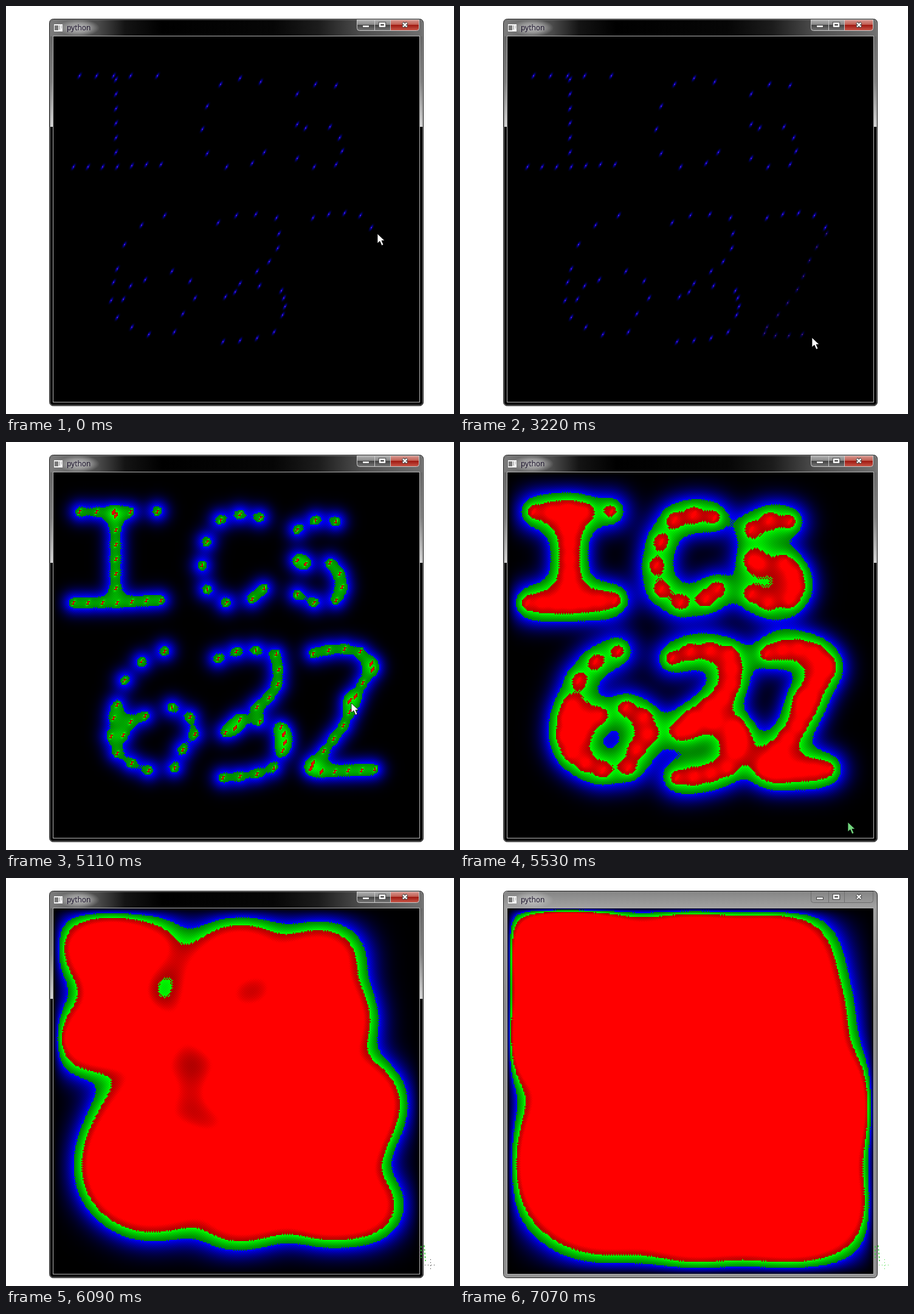
These frames come from a looping animation (737 px wide and 672 px high, 7.14 s). An HTML page with a canvas:

```html
<!DOCTYPE html>
<html lang="en">
<head>
<meta charset="utf-8">
<title>python</title>
<style>
  html, body { margin: 0; width: 100%; height: 100%; overflow: hidden; background: #fff; }
  svg, canvas { position: absolute; left: 0; top: 0; }
  canvas { left: 78px; top: 50px; width: 602px; height: 602px; image-rendering: pixelated; }
  text { font: 12px "Open Sans", "Noto Sans", sans-serif; }
  .inactive .active-only, svg:not(.inactive) .inactive-only { display: none; }
</style>
</head>
<body>
<svg id="chrome" width="737" height="672" viewBox="0 0 737 672">
  <defs>
    <linearGradient id="bar">
      <stop offset="0" stop-color="#7c7c7c"/><stop offset=".13" stop-color="#4a4a4a"/>
      <stop offset=".2" stop-color="#141414"/><stop offset=".3" stop-color="#000"/>
      <stop offset=".6" stop-color="#060606"/><stop offset=".72" stop-color="#1c1c1c"/>
      <stop offset=".83" stop-color="#4c4c4c"/><stop offset="1" stop-color="#707070"/>
    </linearGradient>
    <linearGradient id="side" x2="0" y2="1">
      <stop offset="0" stop-color="#666"/><stop offset=".5" stop-color="#808080"/><stop offset="1" stop-color="#d4d4d4"/>
    </linearGradient>
    <linearGradient id="dull" x2="0" y2="1">
      <stop offset="0" stop-color="#858585"/><stop offset=".04" stop-color="#a0a0a0"/>
      <stop offset=".3" stop-color="#8c8c8c"/><stop offset="1" stop-color="#929292"/>
    </linearGradient>
    <linearGradient id="glass" x2="0" y2="1">
      <stop offset="0" stop-color="#b4b4b4"/><stop offset=".48" stop-color="#858585"/>
      <stop offset=".5" stop-color="#444"/><stop offset="1" stop-color="#777"/>
    </linearGradient>
    <linearGradient id="close" x2="0" y2="1">
      <stop offset="0" stop-color="#d89d96"/><stop offset=".48" stop-color="#c0584c"/>
      <stop offset=".5" stop-color="#a01a12"/><stop offset="1" stop-color="#c8584a"/>
    </linearGradient>
    <radialGradient id="glow">
      <stop offset="0" stop-color="#d0d0d0" stop-opacity=".85"/><stop offset=".55" stop-color="#bbb" stop-opacity=".6"/>
      <stop offset="1" stop-color="#bbb" stop-opacity="0"/>
    </radialGradient>
  </defs>
  <g class="active-only">
    <rect x="72" y="22" width="614.5" height="636.5" rx="6" fill="#000"/>
    <path d="M73 50V28q0-5 5-5H681q5 0 5 5V50z" fill="url(#bar)"/>
    <path d="M73 50h4v149h-4zM681 50h5v149h-5z" fill="url(#side)"/>
    <rect x="72.5" y="22.5" width="613" height="635" rx="5" fill="none" stroke="#aaa" opacity=".75"/>
  </g>
  <rect class="inactive-only" x="72" y="22" width="614.5" height="636.5" rx="6" fill="url(#dull)"/>
  <rect x="71.5" y="21.5" width="615" height="637" rx="6" fill="none" stroke="#1c1c1c"/>
  <rect x="77.5" y="49.5" width="603" height="603" fill="#000" stroke="#b4b4b4"/>
  <ellipse cx="120" cy="36" rx="34" ry="14" fill="url(#glow)"/>
  <path d="M79 30h14v12H79z" fill="#f4f4f4"/>
  <path d="M80 32h6v8h-6z" fill="#777"/><path d="M87 32h2v7h-2zM91 32h1v5h-1z" fill="#bbb"/>
  <text x="100" y="40" fill="#140b26">python</text>
  <g class="active-only" stroke="#c9c9c9">
    <path d="M577.5 22.5H606.5V40.5H581.5q-4 0-4-4z" fill="url(#glass)"/>
    <path d="M606.5 22.5H632.5V40.5H606.5z" fill="url(#glass)"/>
    <path d="M632.5 22.5H679.5V36.5q0 4-4 4H632.5z" fill="url(#close)"/>
  </g>
  <path class="inactive-only" d="M577.5 22V36.5q0 4 4 4H675.5q4 0 4-4V22M606.5 22V40M632.5 22V40" fill="none" stroke="#6e6e6e"/>
  <g fill="none" stroke="#444" stroke-width="4.5">
    <path d="M586 33.5h12M615 28.5h8v5h-8zM652.5 27.5l7.5 7M660 27.5l-7.5 7"/>
    <path d="M587 33.5h10M615 28.5h8v5h-8zM653 28l6.5 6M659.5 28l-6.5 6" stroke="#fff" stroke-width="2.4"/>
  </g>
</svg>
<canvas id="field" width="301" height="301"></canvas>
<svg width="737" height="672" viewBox="0 0 737 672">
  <path id="pointer" d="M0 0V16l4-3.5 3 7 3-1.3-3-6.7h5z" stroke="#000" stroke-width=".8"/>
  <g id="specks" fill="none">
    <path d="M688 605l2 26M683 606v20" stroke="#3c3" stroke-width="1.5" stroke-dasharray="3 3"/>
    <path id="cross" d="M698.5 628v20M689 637.5h20" stroke-dasharray="1 4"/>
  </g>
</svg>
<script>
const LOOP = 7140, TICK = 70, GROW_START = 4410, GROW_STEPS = 32, CELLS = 301;
const WHITE_UNTIL = 5250, POINTER_GONE = 6020, BLUR_AT = 7070;
const FIRST_CLICK = 140, CLICK_EVERY = 280, LATE_CLICK = 4970;

// Each stroke carries evenly spaced heat sources: count, path.
const strokes = [
  // I
  [4, "M120 114H204"], [1, "M248 113h1"], [6, "M179 119V240"], [7, "M109 264H184L254 259"],
  // C
  [3, "M417 123Q377 112 351 127"], [4, "M329 163Q313 208 333 251L361 264"], [2, "M403 258L423 240"],
  // S
  [3, "M542 130Q505 118 478 143"], [2, "M478 193L492 200"], [4, "M532 198Q568 228 542 260"], [2, "M506 264L478 250"],
  // 6
  [4, "M260 343Q190 365 182 431"], [5, "M176 453L170 492 186 520 234 540"], [3, "M192 482L202 460 228 450"],
  [5, "M276 536L288 506 309 489V455L272 436"],
  // 3
  [4, "M347 356Q390 332 443 348"], [4, "M447 373Q455 410 411 435"], [3, "M383 455V467L359 477"],
  [1, "M415 460h1"], [4, "M451 468Q463 486 453 508"], [4, "M439 536Q400 552 355 552"],
  // 2, upper bow
  [5, "M504 347Q580 325 600 363"]
];
// The rest of the 2 is clicked in while the loop runs.
const clickedStrokes = [[7, "M601 374Q570 415 560 460L522 508"], [2, "M504 528L500 538"], [5, "M518 542L605 538"]];

function dotsOn([count, d]) {
  const path = document.createElementNS("http://www.w3.org/2000/svg", "path");
  path.setAttribute("d", d);
  const gap = path.getTotalLength() / Math.max(1, count - 1);
  return Array.from({ length: count }, (_, i) => path.getPointAtLength(count > 1 ? i * gap : 0));
}
const toSource = (p, born) => ({ x: (p.x - 78) / 2, y: (p.y - 50) / 2, born });

const clicks = clickedStrokes.flatMap(dotsOn);
const clickTime = i => FIRST_CLICK + i * CLICK_EVERY;
const sources = [
  ...strokes.flatMap(dotsOn).map(p => toSource(p, -1)),
  ...clicks.map((p, i) => toSource(p, clickTime(i))),
  toSource({ x: 564, y: 425 }, LATE_CLICK)
];
// Sources in a crowd feed less heat each.
for (const s of sources) {
  const crowd = sources.reduce((sum, o) => sum + Math.exp(-((s.x - o.x) ** 2 + (s.y - o.y) ** 2) / 162), 0);
  s.share = crowd ** -0.4;
}

// The pointer runs a little ahead of the clicks, then leaves and returns.
const pointerStops = [
  [0, 611, 375],
  ...clicks.map((p, i) => [clickTime(i) - 220, p.x, p.y + 7]).slice(1),
  [3850, 621, 545], [3990, 621, 545], [4130, 689, 632], [4410, 689, 632],
  [4620, 575, 649], [5110, 568, 430], [5250, 568, 430], [5530, 638, 626], [5810, 670, 629], [5950, 678, 635]
];

const byId = id => document.getElementById(id);
const ctx = byId("field").getContext("2d");
const image = ctx.createImageData(CELLS, CELLS);
const heat = new Float32Array(CELLS * CELLS);

// One-dimensional spread with mirrored negatives, so the walls stay cold.
function spread(center, sigma) {
  const g = d => Math.exp(-d * d / (2 * sigma * sigma));
  return Float32Array.from({ length: CELLS }, (_, i) =>
    Math.max(0, g(i - center) - g(i + 1 + center) - g(2 * CELLS - i - center)));
}

function addBlob({ x, y }, weight, sigma) {
  const gx = spread(x, sigma), gy = spread(y, sigma);
  for (let j = 0; j < CELLS; j++) {
    const k = weight * gy[j];
    if (k < 0.2) continue;
    for (let i = 0, p = j * CELLS; i < CELLS; i++) heat[p + i] += k * gx[i];
  }
}

function addSlash({ x, y }, weight) {
  const cx = Math.round(x), cy = Math.round(y);
  for (let dy = -3; dy <= 3; dy++)
    for (let dx = -3; dx <= 3; dx++)
      heat[(cy + dy) * CELLS + cx + dx] += weight * Math.exp(-((dx + dy / 2) ** 2) / 0.9 - dy * dy / 4);
}

function drawField(t) {
  const n = Math.max(0, Math.min(GROW_STEPS, (t - GROW_START) / TICK));
  const sigma = 0.725 * n;
  const broad = n < 10 ? 21.4 * n : 330 * Math.exp(0.072 * (n - 16));
  const core = Math.min(270, 1.05 * n * n);
  const live = sources.filter(s => s.born <= t);

  heat.fill(0);
  for (const s of live) {
    if (n) {
      addBlob(s, broad * s.share, sigma);
      addBlob(s, core * s.share, Math.min(sigma, 4.5));
    }
    addSlash(s, (n || s.born < 0 ? 230 : 120) + 14 * Math.min(n, 10));
  }

  const px = image.data;
  for (let p = 0; p < heat.length; p++) {
    const odd = (p % CELLS + (p / CELLS | 0)) & 1;
    const v = heat[p] * (n ? (odd ? 1.02 : 0.98) : 1), q = p * 4;
    px[q] = v >= 510 ? v / 3 : 0;
    px[q + 1] = v >= 255 && v < 510 ? v / 2 : 0;
    px[q + 2] = v < 255 ? v : 0;
    px[q + 3] = 255;
  }
  if (!n) for (const s of live) {
    const q = (Math.round(s.y) * CELLS + Math.round(s.x)) * 4;
    px[q] = 75; px[q + 1] = 25;
  }
  ctx.putImageData(image, 0, 0);
}

function pointerAt(t) {
  const next = pointerStops.findIndex(k => k[0] > t);
  if (next < 0) return pointerStops.at(-1).slice(1);
  const [t0, x0, y0] = pointerStops[next - 1], [t1, x1, y1] = pointerStops[next];
  const f = (t - t0) / (t1 - t0);
  return [x0 + (x1 - x0) * f, y0 + (y1 - y0) * f];
}

function render(t) {
  drawField(t);
  const [x, y] = pointerAt(t).map(Math.round), pointer = byId("pointer");
  pointer.setAttribute("transform", `translate(${x} ${y})`);
  pointer.setAttribute("fill", t < WHITE_UNTIL ? "#fff" : "#72d67e");
  pointer.style.display = t < POINTER_GONE ? "" : "none";
  byId("specks").style.display = t < POINTER_GONE ? "none" : "";
  byId("cross").setAttribute("stroke", t < 6440 ? "#222" : "#4d4");
  byId("chrome").classList.toggle("inactive", t >= BLUR_AT);
}

const start = performance.now();
let shown = -1;
function frame() {
  const tick = Math.floor((performance.now() - start) % LOOP / TICK);
  if (tick !== shown) render((shown = tick) * TICK);
  requestAnimationFrame(frame);
}
frame();
</script>
</body>
</html>
```
